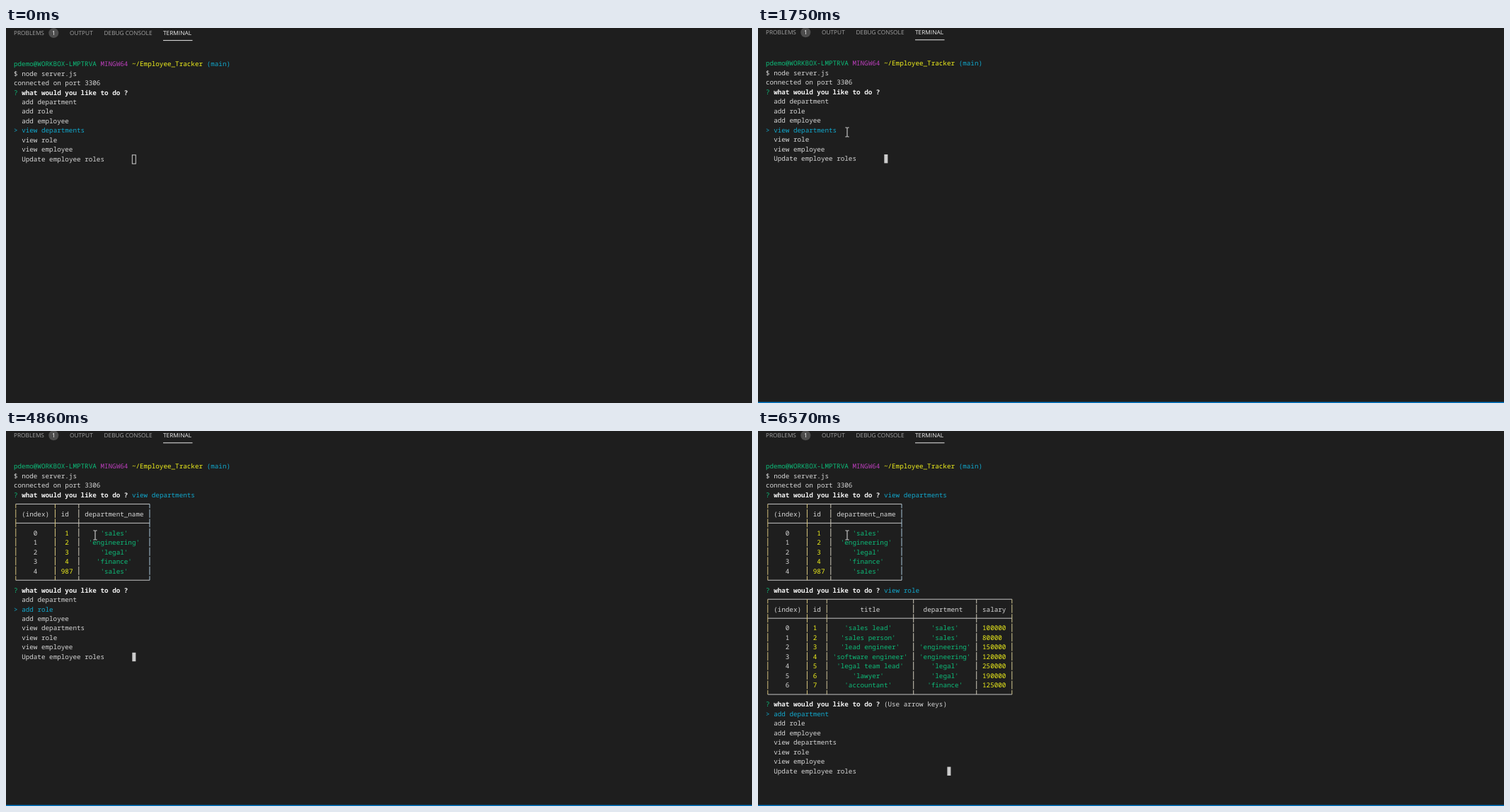
Recreate the animation shown at these times as an HTML page. Size 1054 by 531 pixels, loop 8 s.

```html
<!DOCTYPE html>
<html lang="en">
<head>
<meta charset="utf-8">
<title>Employee tracker terminal</title>
<style>
  html, body { margin: 0; width: 100%; height: 100%; overflow: hidden; background: #1e1e1e; }
  svg { display: block; width: 1054px; height: 531px; }
  text { text-rendering: geometricPrecision; white-space: pre; }
  #screen text { font: 9.275px "Noto Sans Mono", "DejaVu Sans Mono", monospace; }
  #screen .bold { font-weight: 700; }
  #tabs text { font: 8.3px "Open Sans", "Noto Sans", sans-serif; fill: #a2a2a2; }
  #tabs .active { fill: #f0f0f0; }
  #tabs .count { fill: #fff; text-anchor: middle; }
</style>
</head>
<body>
<svg viewBox="0 0 1054 531">
  <rect width="1054" height="531" fill="#1e1e1e"/>
  <g id="panel">
    <g id="tabs">
      <text x="11" y="9.4">PROBLEMS</text>
      <circle cx="67.3" cy="6.3" r="7" fill="#4d4d4d"/>
      <text class="count" x="67.3" y="9.3">1</text>
      <text x="90" y="9.4">OUTPUT</text>
      <text x="138.5" y="9.4">DEBUG CONSOLE</text>
      <text class="active" x="222" y="9.4">TERMINAL</text>
      <rect x="222" y="16.3" width="41.5" height="1" fill="#e7e7e7"/>
    </g>
    <g id="screen"></g>
    <rect id="caret" width="5" height="12.4"/>
  </g>
  <rect id="statusBar" y="529.6" width="1054" height="1.4" fill="#007acc"/>
  <circle id="click" cx="124" cy="147" r="11" fill="none" stroke="#b0b0b0"/>
  <path id="mouse" d="M-2.5-6.5h2L0-6l.5-.5h2M0-6V6M-2.5 6.5h2L0 6l.5.5h2" fill="none" stroke="#e4e4e4"/>
</svg>
<script>
const LOOP = 8000, CELL = 5.565, LINE = 13.48, LEFT = 11, FRAME = 460 / 6;
const C = { text: '#d6d6d6', white: '#f2f2f2', green: '#0dbc79', cyan: '#11a8cd', magenta: '#bc3fbc', yellow: '#f0f01c' };
const $ = id => document.getElementById(id);

const colX = col => LEFT + col * CELL;
const rowMid = row => 49.5 + row * LINE;

// Each word is anchored to its own terminal column.
const put = (row, col, str, color = C.text, cls = '') =>
  [...str.matchAll(/\S+/g)].map(m =>
    `<text class="${cls}" x="${colX(col + m.index)}" y="${rowMid(row) + 3.8}" fill="${color}">${m[0].replace('>', '&gt;')}</text>`).join('');

const line = (x1, y1, x2, y2, color) =>
  `<path d="M${x1} ${y1}L${x2} ${y2}" stroke="${color}"/>`;

const CHOICES = ['add department', 'add role', 'add employee', 'view departments', 'view role', 'view employee', 'Update employee roles'];
const quote = s => `'${s}'`;

const departments = {
  widths: [9, 5, 17],
  head: ['(index)', 'id', 'department_name'],
  rows: [[1, 'sales'], [2, 'engineering'], [3, 'legal'], [4, 'finance'], [987, 'sales']],
  bars: ['#d3bf7c', '#d9c680', '#cfcaba', '#a9c6d8']
};
const roles = {
  widths: [9, 4, 21, 15, 8],
  head: ['(index)', 'id', 'title', 'department', 'salary'],
  rows: [
    [1, 'sales lead', 'sales', 100000], [2, 'sales person', 'sales', 80000],
    [3, 'lead engineer', 'engineering', 150000], [4, 'software engineer', 'engineering', 120000],
    [5, 'legal team lead', 'legal', 250000], [6, 'lawyer', 'legal', 190000], [7, 'accountant', 'finance', 125000]
  ],
  bars: ['#d3bf7c', '#d9c680', '#cfc49a', '#cfcaba', '#cfcaba', '#d3c890']
};

function drawTable(top, { widths, head, rows, bars }) {
  const edges = [0];
  widths.forEach(w => edges.push(edges.at(-1) + w + 1));
  const xs = edges.map(e => colX(e + .5));
  const bottom = top + rows.length + 3;
  let out = '';

  const cell = (row, i, str, color) => {
    const pad = Math.floor((widths[i] - str.length) / 2);
    out += put(row, edges[i] + 1 + pad, str, color);
  };
  head.forEach((h, i) => cell(top + 1, i, h));
  rows.forEach((values, r) => {
    cell(top + 3 + r, 0, String(r));
    values.forEach((v, i) => {
      const isText = typeof v === 'string';
      cell(top + 3 + r, i + 1, isText ? quote(v) : String(v), isText ? C.green : C.yellow);
    });
  });

  for (const r of [top, top + 2, bottom]) out += line(xs[0], rowMid(r), xs.at(-1), rowMid(r), '#c4c4c4');
  for (let r = top; r <= bottom; r++) {
    const up = r === top ? 0 : 6, down = r === bottom ? 0 : 6;
    xs.forEach((x, i) => out += line(x, rowMid(r) - up, x, rowMid(r) + down, bars[i]));
  }
  return out;
}

const question = row =>
  put(row, 0, '?', C.green) + put(row, 2, 'what would you like to do ?', C.white, 'bold');
const answer = (row, str) => question(row) + put(row, 30, str, C.cyan);

function menu(row, selected, hint = false) {
  let svg = question(row);
  if (hint) svg += put(row, 30, '(Use arrow keys)');
  CHOICES.forEach((choice, i) => {
    const on = i === selected;
    if (on) svg += put(row + 1 + i, 0, '>', C.cyan);
    svg += put(row + 1 + i, 2, choice, on ? C.cyan : C.text);
  });
  return { svg, caret: [row + CHOICES.length, hint ? 46 : 30] };
}

const after = (before, m) => ({ svg: before + m.svg, caret: m.caret });

const intro =
  put(0, 0, 'pdemo@WORKBOX-LMPTRVA', C.green) + put(0, 22, 'MINGW64', C.magenta) +
  put(0, 30, '~/Employee_Tracker', C.yellow) + put(0, 49, '(main)', C.cyan) +
  put(1, 0, '$ node server.js') + put(2, 0, 'connected on port 3306');
const firstAnswer = intro + answer(3, 'view departments');
const withDepartments = firstAnswer + drawTable(4, departments);
const secondAnswer = withDepartments + answer(13, 'view role');
const withRoles = secondAnswer + drawTable(14, roles);

const screens = [
  [0, after(intro, menu(3, 3))],
  [3150, { svg: firstAnswer, caret: [4, 0] }],
  [3240, after(withDepartments, menu(13, 0, true))],
  [4860, after(withDepartments, menu(13, 1))],
  [5090, after(withDepartments, menu(13, 2))],
  [5410, after(withDepartments, menu(13, 3))],
  [5640, after(withDepartments, menu(13, 4))],
  [6500, { svg: secondAnswer, caret: [14, 0] }],
  [6570, after(withRoles, menu(25, 0, true))]
];
const clicks = [[1670, 1750], [1820, 1990], [2370, 2450]];

function progress(t, start, count) {
  const k = Math.floor((t - start) / FRAME + .05);
  const p = Math.min(Math.max(k / count, 0), 1);
  return 1 - (1 - p) ** 2;
}

function pointer(t) {
  const mix = (a, b, p) => a + (b - a) * p;
  if (t < 1360) {
    const p = progress(t, 210, 6);
    return [mix(767, 154, p), mix(397, 181, p)];
  }
  const p = progress(t + FRAME, 1360, 4);
  return [mix(154, 126, p), mix(181, 147.5, p)];
}

let shown = null;
function render(t) {
  const screen = screens.findLast(([at]) => t >= at)[1];
  if (screen !== shown) {
    shown = screen;
    $('screen').innerHTML = screen.svg;
  }
  const focused = t >= 1670;
  const [row, col] = screen.caret;
  $('caret').setAttribute('x', colX(col) + .4);
  $('caret').setAttribute('y', 44.2 + row * LINE);
  $('caret').setAttribute('fill', focused ? '#cccccc' : 'none');
  $('caret').setAttribute('stroke', focused ? 'none' : '#cccccc');

  const settled = t >= 900;
  $('panel').setAttribute('transform', `translate(0 ${settled ? 0 : .8})`);
  $('statusBar').style.display = settled ? '' : 'none';

  $('mouse').style.display = t >= 210 ? '' : 'none';
  $('mouse').setAttribute('transform', `translate(${pointer(t)})`);
  $('click').style.display = clicks.some(([a, b]) => t >= a && t < b) ? '' : 'none';
}

const start = performance.now();
function tick() {
  render((performance.now() - start) % LOOP);
  requestAnimationFrame(tick);
}
tick();
</script>
</body>
</html>
```
